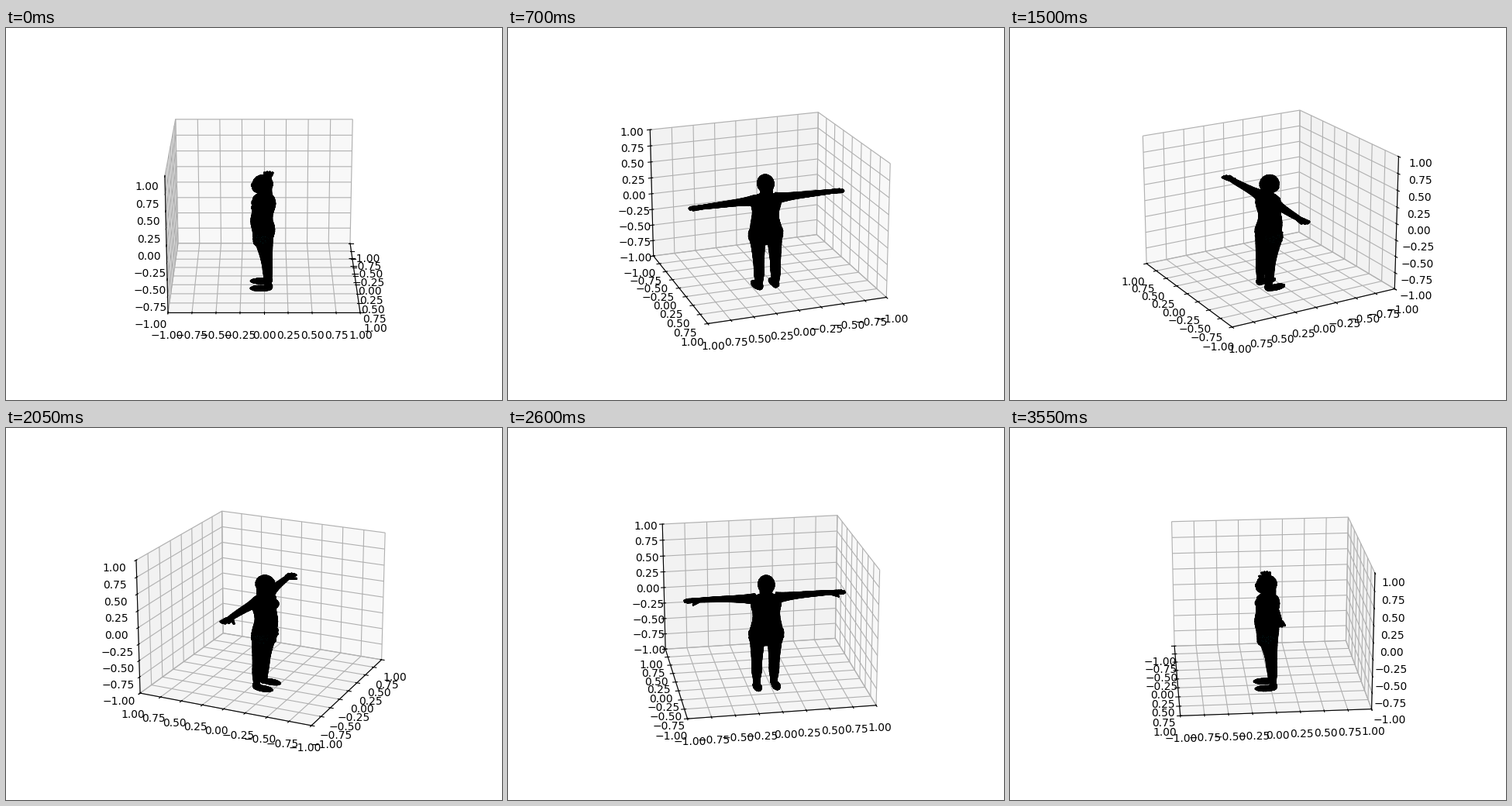
A matplotlib script that plays this animation: 640x480 px, repeating every 3600 ms.

```python
import numpy as np
import matplotlib.pyplot as plt
from matplotlib.animation import FuncAnimation
from mpl_toolkits.mplot3d.art3d import Poly3DCollection

FRAMES, INTERVAL = 72, 50
STEP = 360 / FRAMES
ELEV = 20
BLACK, TEAL = (0, 0, 0, 1), (0, 0.45, 0.5, 1)


def bump(x, center, width):
    return np.exp(-((x - center) / width) ** 2)


def skin(x, y, z, ru, rv, plane="xy", m=12):
    """Quads around a chain of elliptic rings lying in the given plane."""
    rows = np.stack(np.broadcast_arrays(x, y, z, ru, rv), axis=1)
    caps = rows[[0, -1]] * [1, 1, 1, 0, 0]
    rows = np.vstack([caps[:1], rows, caps[1:]])
    u, v = ("xyz".index(c) for c in plane)
    a = np.linspace(0, 2 * np.pi, m + 1)
    rings = np.repeat(rows[:, None, :3], m + 1, axis=1)
    rings[:, :, u] += rows[:, 3:4] * np.cos(a)
    rings[:, :, v] += rows[:, 4:5] * np.sin(a)
    quads = np.stack([rings[:-1, :-1], rings[1:, :-1],
                      rings[1:, 1:], rings[:-1, 1:]], axis=2)
    return quads.reshape(-1, 4, 3)


def ellipsoid(center, radii, n=8, m=12):
    p = np.linspace(-1.5, 1.5, n)
    (x, y, z), (rx, ry, rz) = center, radii
    return skin(x, y, z + rz * np.sin(p), rx * np.cos(p), ry * np.cos(p), m=m)


def finger(start, end, r0, r1):
    x, y, z = np.linspace(start, end, 3).T
    r = np.linspace(r0, r1, 3)
    return skin(x, y, z, r, r, "yz", 5)


def half_width(z):
    return 0.14 + 0.045 * bump(z, -0.35, 0.2) + 0.025 * bump(z, 0.14, 0.1)


def torso():
    z = np.linspace(-0.46, 0.285, 20)
    front = 0.115 + 0.028 * bump(z, -0.14, 0.14) + 0.012 * bump(z, 0.12, 0.08)
    back = 0.085 + 0.038 * bump(z, 0.13, 0.13) + 0.03 * bump(z, -0.28, 0.11)
    taper = np.sqrt(np.clip((0.29 - z) / 0.08, 0, 1))
    return skin(0, (back - front) / 2, z, half_width(z) * taper,
                (back + front) / 2 * taper, m=16)


def head():
    return [skin(0, 0.012, np.linspace(0.2, 0.37, 4), 0.062, 0.068),
            ellipsoid((0, -0.015, 0.428), (0.088, 0.108, 0.128), 10, 16),
            ellipsoid((0, -0.060, 0.370), (0.058, 0.066, 0.066)),
            ellipsoid((0, -0.112, 0.410), (0.018, 0.025, 0.030))]


def leg(side):
    s = np.linspace(0, 1.05, 15)    # ankle to hip
    rx = 0.030 + 0.048 * s + 0.010 * bump(s, 0.25, 0.15)
    ry = 0.028 + 0.04 * s + 0.03 * s**3 + 0.006 * bump(s, 0.3, 0.15)
    return [skin(0.097 * side, 0.044 - 0.05 * s**2, 0.72 * s - 1.12, rx, ry),
            ellipsoid((0.093 * side, 0.048, -1.115), (0.034, 0.042, 0.055)),
            ellipsoid((0.104 * side, -0.035, -1.138), (0.044, 0.118, 0.035))]


def arm(side):
    u = np.linspace(0, 1, 15)       # shoulder to hand
    r = 0.022 + 0.055 * (1 - u)**4 + 0.013 * np.sin(np.pi * u)
    parts = [skin(side * (0.12 + 0.7 * u), 0.05 - 0.038 * (1 - u)**2,
                  0.218 - 0.015 * (1 - u)**3, r, r, "yz", 8),
             ellipsoid((0.775 * side, 0.05, 0.217), (0.06, 0.044, 0.02)),
             finger((0.73 * side, 0.03, 0.208), (0.80 * side, -0.026, 0.188),
                    0.018, 0.010)]
    for k in np.arange(4) - 1.5:
        parts.append(finger((0.79 * side, 0.05 + 0.022 * k, 0.216),
                            (side * (0.885 - 0.012 * k**2), 0.05 + 0.03 * k, 0.214),
                            0.013, 0.009))
    return parts


def hip_specks(count=60):
    """Small facets on both hips where the mesh is loose."""
    rng = np.random.default_rng(4)
    dy, dz = np.array([0, 0.014, 0]), np.array([0, 0, 0.014])
    quads = []
    for i in range(2 * count):
        a, z = rng.uniform(-1, 1), rng.uniform(-0.40, -0.28)
        x = (-1)**i * 1.03 * half_width(z) * np.cos(a)
        c = np.array([x, 0.118 * np.sin(a) - 0.01, z])
        quads.append([c - dy, c - dz, c + dy, c + dz])
    return np.array(quads)


parts = [torso(), *head()]
for side in (1, -1):
    parts += leg(side) + arm(side)
    parts.append(ellipsoid((0.078 * side, -0.072, 0.105), (0.062, 0.062, 0.066)))
body, specks = np.concatenate(parts), hip_specks()

fig = plt.figure(figsize=(6.4, 4.8), dpi=100)
ax = fig.add_subplot(projection="3d")
ax.add_collection3d(Poly3DCollection(
    np.concatenate([body, specks]),
    facecolors=[BLACK] * len(body) + [TEAL] * len(specks),
    edgecolors=[BLACK] * (len(body) + len(specks)), linewidths=1))
ax.set(xlim=(-1, 1), ylim=(-1, 1), zlim=(-1, 1))


def update(i):
    ax.view_init(elev=ELEV, azim=STEP * i)
    return []


anim = FuncAnimation(fig, update, frames=FRAMES, interval=INTERVAL,
                     init_func=lambda: update(0), repeat=True, repeat_delay=0)
plt.show()
```
